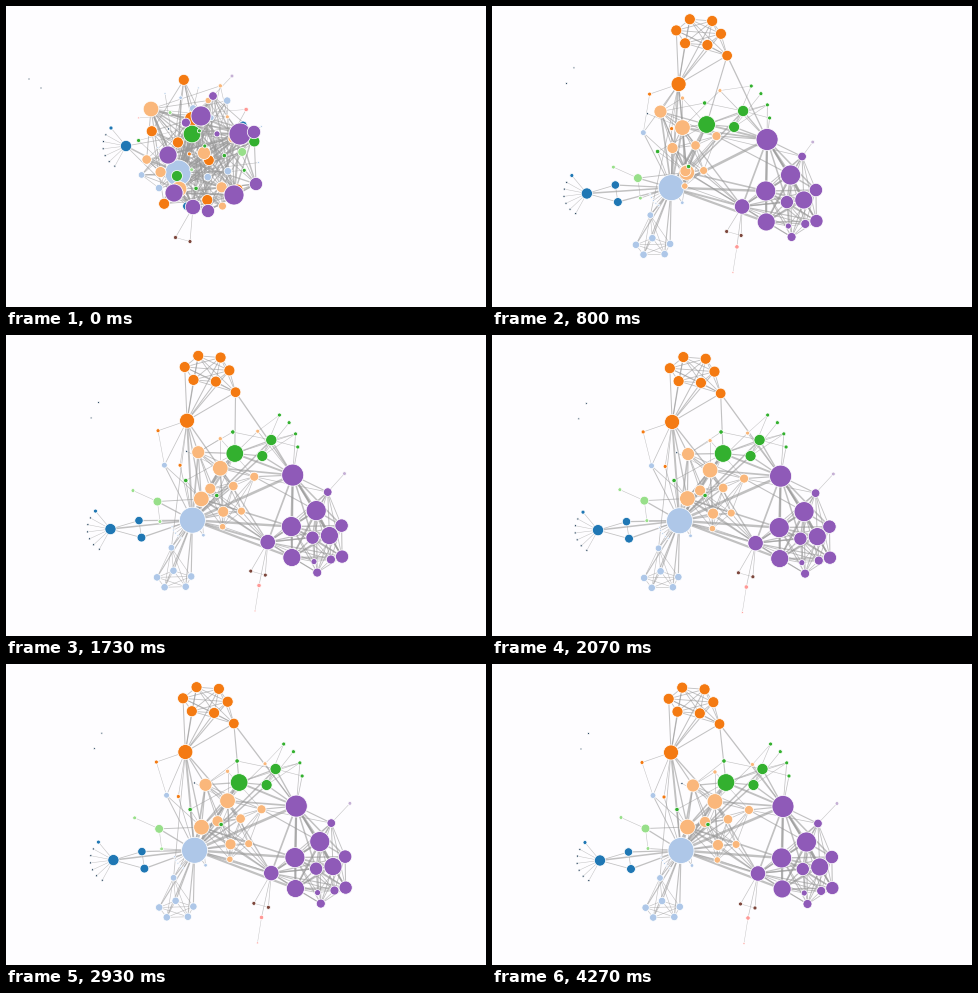
Recreate the animation shown at these times as a matplotlib script. Size 480 by 301 pixels, loop 4.34 s.

```python
import itertools
import random

import matplotlib.pyplot as plt
import numpy as np
from matplotlib.animation import FuncAnimation
from matplotlib.collections import LineCollection

W, H, DPI = 480, 301, 64
FRAMES, LOOP = 65, 4340
PX = 72 / DPI          # points per pixel
BURST = 470            # length of the fast untangling, ms
BACKGROUND = "#fefdff"
DARK = "#26415c"

# The first letter of a node's name is its cluster.
COLORS = {
    "I": DARK, "b": DARK, "R": DARK, "B": "#1f77b4",
    "L": "#aec7e8", "l": "#aec7e8", "O": "#f47a12", "T": "#fab77b",
    "J": "#fab77b", "G": "#33b02f", "F": "#98df8a", "M": "#ff9896",
    "P": "#8f5ab8", "V": "#c5b0d5", "C": "#7c463c",
}

# How far each cluster still drifts after the burst.
DRIFT = {
    "I": (21, 11), "B": (19, 13), "b": (19, 13), "L": (14, 7), "l": (16, 7),
    "O": (-11, 15), "T": (47, 23), "J": (1, -5), "G": (28, 0),
    "F": (11, -11), "R": (50, 17), "M": (16, 19), "P": (23, 13),
    "V": (35, 5), "C": (20, 21),
}

# Where the big nodes sit in the first tangle; the rest fill a disc.
TANGLE = {
    "I0": (23, 73), "I1": (35, 82), "B0": (120, 140), "L0": (172, 167),
    "O0": (186, 113), "T0": (145, 103), "T1": (198, 147), "J0": (173, 183),
    "G0": (186, 128), "P0": (234, 128), "P1": (195, 110), "P2": (228, 189),
    "P3": (248, 126), "P4": (250, 178), "P6": (168, 187), "P7": (162, 149),
    "P10": (202, 205), "P11": (187, 201), "P12": (207, 90),
}
DISC_CENTER, DISC_SIZE = np.array([192, 140]), 68

LINKS = {
    "B0": "B1 B2 B3 L0", "B1": "B2 L0", "B2": "L0",
    "L0": "O0 O8 T0 T1 T3 T4 T5 T6 T7 J0 L1 L2 F0 F2 "
          "G0 G1 G2 G8 G9 P0 P1 P6 P11",
    "L1": "O0 O9 J0", "L3": "O0 J0",
    "O0": "O8 O9 T0 T1 J0", "O7": "G0 P0",
    "J0": "T0 T1 T3 T4 T5 T6 T7 L2 G0 G8 G9 F0 P1 P11",
    "T0": "T1 T3 T4 T5 T6 T7 T8 T9 T10 R0 G0 P0 P11",
    "T1": "T5 T6 T7 T8 T9 G0 G7",
    "T8": "T3 T4 T5 T6 T7 T9 P0 P2 P12",
    "T10": "G3 P0",
    "G0": "G1 G2 G5 G8 G9 P0", "G1": "G2 G5 G6 G7 P0",
    "G2": "G3 G4 G5 P0", "F0": "F1 F2",
    "P0": "G5 G6 P1 P2 P3 P4 P6 P7 P10 P11 P12",
    "P9": "P1 P2 P3 P6 P8 P10 P11",
    "P11": "T3 T4 T6 T7 M0 C0 C1",
    "P12": "P1 P2 P3 P4 P6 P7 P10 P11 V0",
    "M0": "M1", "C0": "C1",
}

index, radius, rest, parent = {}, [], [], {}


def node(name, r, x, y, hub=None):
    index[name] = len(rest)
    radius.append(r)
    rest.append((x, y))
    if hub:
        parent[name] = hub


def names(letter, first, count):
    return [f"{letter}{n}" for n in range(first, first + count)]


def ring(members, r, center, size, start, step, hub=None):
    """Spread members over an ellipse, angles in degrees."""
    angles = np.radians(start + step * np.arange(len(members)))
    for name, size_r, a in zip(members, np.broadcast_to(r, len(members)), angles):
        node(name, size_r, center[0] + size[0] * np.cos(a),
             center[1] + size[1] * np.sin(a), hub)


node("I0", 1, 89, 85)
node("I1", 1, 96.5, 69.5)

node("B0", 5.6, 108, 196.5)
ring(names("b", 0, 6), 1.1, (108, 196.5), (23, 23), 119, 18, "B0")
node("B1", 4.2, 136.5, 188)
node("B2", 4.4, 139, 205)
node("B3", 2, 93, 178.5, "B0")

ring(names("l", 0, 5), 1, (189, 186.5), (21, 21), 122, 10)
node("L0", 13, 189, 186.5)
node("L1", 2.9, 161, 131.5)
node("L2", 1.8, 200, 201.5)
node("L3", 3.3, 168, 214)
ring(names("L", 4, 5), 3.7, (171, 246), (18, 9), 195, 72)

node("O0", 7.5, 179, 88.5)
ring(names("O", 1, 6), 5.5, (199, 36.5), (22.5, 14), 187, 60)
node("O7", 5.3, 227.5, 60)
node("O8", 2, 172, 133)
node("O9", 2, 150, 98.5)

node("T0", 7.8, 223, 137.5)
node("T1", 6.5, 201, 121.5)
node("J0", 7.8, 195.5, 163)
ring(names("T", 3, 4), np.linspace(3.2, 5.5, 4), (226, 174), (19, 22), 92, -75)
node("T7", 5.5, 226, 181)
node("T8", 4.5, 257, 146)
node("T9", 2.1, 223, 108)
node("T10", 2, 260.5, 100.5)
node("R0", 1.1, 190, 119.5)

node("G0", 8.8, 234, 118.5)
node("G1", 5.6, 270.5, 105)
node("G2", 5.5, 261.5, 121)
ring(names("G", 3, 4), 2, (266, 112), (31, 35), -66, 22)
node("G7", 2.2, 232, 97)
node("G8", 2.2, 185, 145.5)
node("G9", 2.2, 216, 160.5)

node("F0", 4.4, 153.5, 164.5)
node("F1", 1.9, 129, 153.5)
node("F2", 1.9, 156, 184.5)
node("M0", 2.2, 256, 254)
node("M1", 1, 252, 279.5)

node("P0", 11, 291, 142.5)
ring(names("P", 1, 6), (10, 10, 6.7, 6.6, 4.5, 9), (315, 209), (29, 31), 209, 60)
ring(names("P", 7, 4), (9, 4.5, 3, 6.6), (320, 216), (12, 17), -50, 90)
node("P11", 7.7, 266, 209.5)
node("P12", 4.3, 326, 159.5)
node("V0", 1.9, 345, 139.5, "P12")
node("C0", 2, 248.5, 240, "P11")
node("C1", 2, 263, 244, "P11")

radius, rest = np.array(radius), np.array(rest, float)
loose = rest - np.array([DRIFT[name[0]] for name in index])

# Tangle: known spots, leaves beside their hubs, all others on a shuffled spiral.
tangled = np.zeros_like(rest)
others = [n for n in index if n not in TANGLE and n not in parent]
random.Random(4).shuffle(others)
for k, name in enumerate(others):
    dist = DISC_SIZE * np.sqrt((k + 0.5) / len(others))
    turn = k * np.pi * (3 - np.sqrt(5))
    tangled[index[name]] = DISC_CENTER + dist * np.array([np.cos(turn), np.sin(turn)])
for name, spot in TANGLE.items():
    tangled[index[name]] = spot
for name, hub in parent.items():
    i, h = index[name], index[hub]
    tangled[i] = tangled[h] + rest[i] - rest[h]

pairs = [(hub, n) for hub, text in LINKS.items() for n in text.split()]
pairs += [("B0", n) for n in names("b", 0, 6)]
pairs += [("L0", n) for n in names("l", 0, 5)]
for clique in (names("O", 0, 8), ["L0", *names("L", 3, 6)], names("T", 3, 5),
               [*names("P", 1, 8), "P10", "P11"]):
    pairs += itertools.combinations(clique, 2)
ends = np.array([(index[a], index[b]) for a, b in pairs])
widths = np.minimum(0.4 + radius[ends].prod(axis=1) / 65, 2.6)


def settle(t, span, tau):
    """Exponential approach from 0 to 1 over span."""
    return (1 - np.exp(-t / tau)) / (1 - np.exp(-span / tau))


def positions(t):
    if t < BURST:
        return tangled + (loose - tangled) * settle(t, BURST, 300)
    return loose + (rest - loose) * settle(t - BURST, LOOP - BURST, 720)


fig = plt.figure(figsize=(W / DPI, H / DPI), dpi=DPI, facecolor=BACKGROUND)
ax = fig.add_axes([0, 0, 1, 1])
ax.set_xlim(0, W)
ax.set_ylim(H, 0)
ax.axis("off")

lines = LineCollection([], colors="#999999", alpha=0.6,
                       linewidths=widths * PX, zorder=1)
ax.add_collection(lines)
dots = ax.scatter(tangled[:, 0], tangled[:, 1], s=(2 * radius * PX) ** 2,
                  c=[COLORS[name[0]] for name in index],
                  edgecolors="white", linewidths=0.75 * PX, zorder=2)


def update(i):
    pos = positions(i * 1000 / 15)
    lines.set_segments(pos[ends])
    dots.set_offsets(pos)
    return lines, dots


anim = FuncAnimation(fig, update, frames=FRAMES, interval=LOOP / FRAMES,
                     init_func=lambda: update(0), repeat=True, repeat_delay=0)
plt.show()
```
